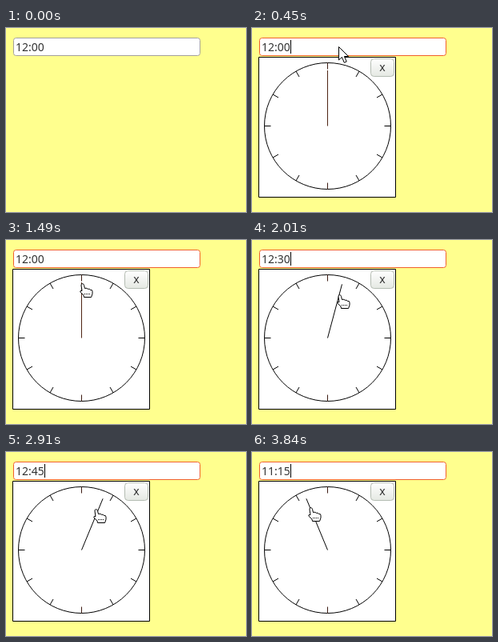
These frames come from a looping animation (300 by 230 pixels, 4.79 s). An HTML page with a canvas:

```html
<!DOCTYPE html>
<html lang="en">
<head>
<meta charset="utf-8">
<title>Clock time picker</title>
<style>
html, body { margin: 0; width: 100%; height: 100%; overflow: hidden; background: #ffff8e; }
canvas { display: block; }
</style>
</head>
<body>
<canvas id="stage" width="300" height="230"></canvas>
<script>
const ctx = document.getElementById('stage').getContext('2d');
const LOOP = 4790, CX = 94.5, CY = 122.5;

// Pointer tip: time, x, y
const path = [
  [883, 108, 23], [1350, 96, 55], [1730, 96, 55], [2370, 127, 86],
  [2510, 127, 86], [2710, 122, 80], [2910, 113, 72], [3070, 102, 66],
  [3270, 91, 62], [3450, 82, 64], [3630, 75, 70], [3839, 75, 70], [3840, 74, 70]
];
// Moves advance in steps: start, step length
const moves = [[0, 40], [930, 420 / 9], [1770, 40], [2550, 40], [3840, 40]];

const arrow = new Path2D('M.5 .5V17L4.5 13.5L7.3 20.3L10.2 19L7.4 12.5H12.5Z');
const hand = new Path2D('M3 9.5L2 3Q1.8 .7 3.5 .6Q5 .6 5.5 2.5L6.5 6.5Q9.5 5.5 10.2 7.3' +
  'Q12.6 6.5 13.2 8.3Q16 7.8 16 10.2V13.2L14.6 17.5H5.5L5 15L.8 11Q.5 8.8 3 9.5Z');

function pointerAt(time) {
  const [start, step] = moves.filter(m => m[0] <= time).pop();
  const t = start + Math.floor((time - start) / step + 1e-6) * step;
  const next = path.findIndex(p => p[0] > t);
  if (next === 0) return path[0].slice(1);
  if (next < 0) return path[path.length - 1].slice(1);
  const a = path[next - 1], b = path[next], f = (t - a[0]) / (b[0] - a[0]);
  return [1, 2].map(i => Math.round(a[i] + (b[i] - a[i]) * f));
}

function roundBox(x, y, w, h, r, fill, stroke) {
  ctx.beginPath();
  ctx.roundRect(x, y, w, h, r);
  ctx.fillStyle = fill;
  ctx.fill();
  ctx.strokeStyle = stroke;
  ctx.stroke();
}

function text(str, x, y) {
  ctx.font = '14px "Noto Sans", "Open Sans", sans-serif';
  ctx.fillStyle = '#333';
  ctx.fillText(str, x, y);
}

function spoke(angle, from, to, color) {
  const s = Math.sin(angle), c = -Math.cos(angle);
  ctx.beginPath();
  ctx.moveTo(CX + s * from, CY + c * from);
  ctx.lineTo(CX + s * to, CY + c * to);
  ctx.strokeStyle = color;
  ctx.stroke();
}

function drawField(value, focused, caret) {
  roundBox(9.5, 12.5, 233, 22, 3, '#fff', focused ? '#f0602c' : '#a3a09c');
  text(value, 12, 29);
  if (caret) {
    ctx.fillStyle = '#000';
    ctx.fillRect(48, 15, 1, 17);
  }
}

function drawClock(quarter) {
  roundBox(8.5, 36.5, 171, 175, 0, '#fff', '#000');
  ctx.beginPath();
  ctx.arc(CX, CY, 79, 0, 7);
  ctx.stroke();
  for (let i = 0; i < 12; i++) spoke(i * Math.PI / 6, 71, 79, i % 6 ? '#000' : '#3c1c12');
  spoke(quarter * Math.PI / 24, 0, 69.5, quarter ? '#000' : '#4e2414');

  const shade = ctx.createLinearGradient(0, 38, 0, 61);
  shade.addColorStop(0, '#fff');
  shade.addColorStop(1, '#e4e8e2');
  roundBox(148.5, 38.5, 29, 22, 4, shade, '#b4bcb2');
  text('x', 159.3, 54);
}

function drawPointer(x, y) {
  const isHand = y >= 37;
  const shape = isHand ? hand : arrow;
  ctx.save();
  ctx.translate(x - (isHand ? 4 : 0), y - (isHand ? 1 : 0));
  ctx.fillStyle = '#fff';
  ctx.fill(shape);
  ctx.strokeStyle = '#000';
  ctx.stroke(shape);
  if (isHand) {
    ctx.fillStyle = '#000';
    for (let i = 0; i < 4; i++) ctx.fillRect(6 + i * 2, 13, 1, 1);
  }
  ctx.restore();
}

function draw(time) {
  const [x, y] = pointerAt(time);
  const quarter = Math.round(Math.atan2(x - 94, 122 - y) / (Math.PI / 24));
  const open = time >= 450, focused = time >= 360;
  const minutes = 720 + (open && y >= 37 ? quarter * 15 : 0);
  const value = Math.floor(minutes / 60) + ':' + String(minutes % 60).padStart(2, '0');

  ctx.lineWidth = 1;
  ctx.fillStyle = '#ffff8e';
  ctx.fillRect(0, 0, 300, 230);
  drawField(value, focused, focused && (time < 1490 || time >= 1770));
  if (open) drawClock((minutes - 720) / 15);
  if (focused) drawPointer(x, y);
}

function tick() {
  draw(performance.now() % LOOP);
  requestAnimationFrame(tick);
}
tick();
</script>
</body>
</html>
```
